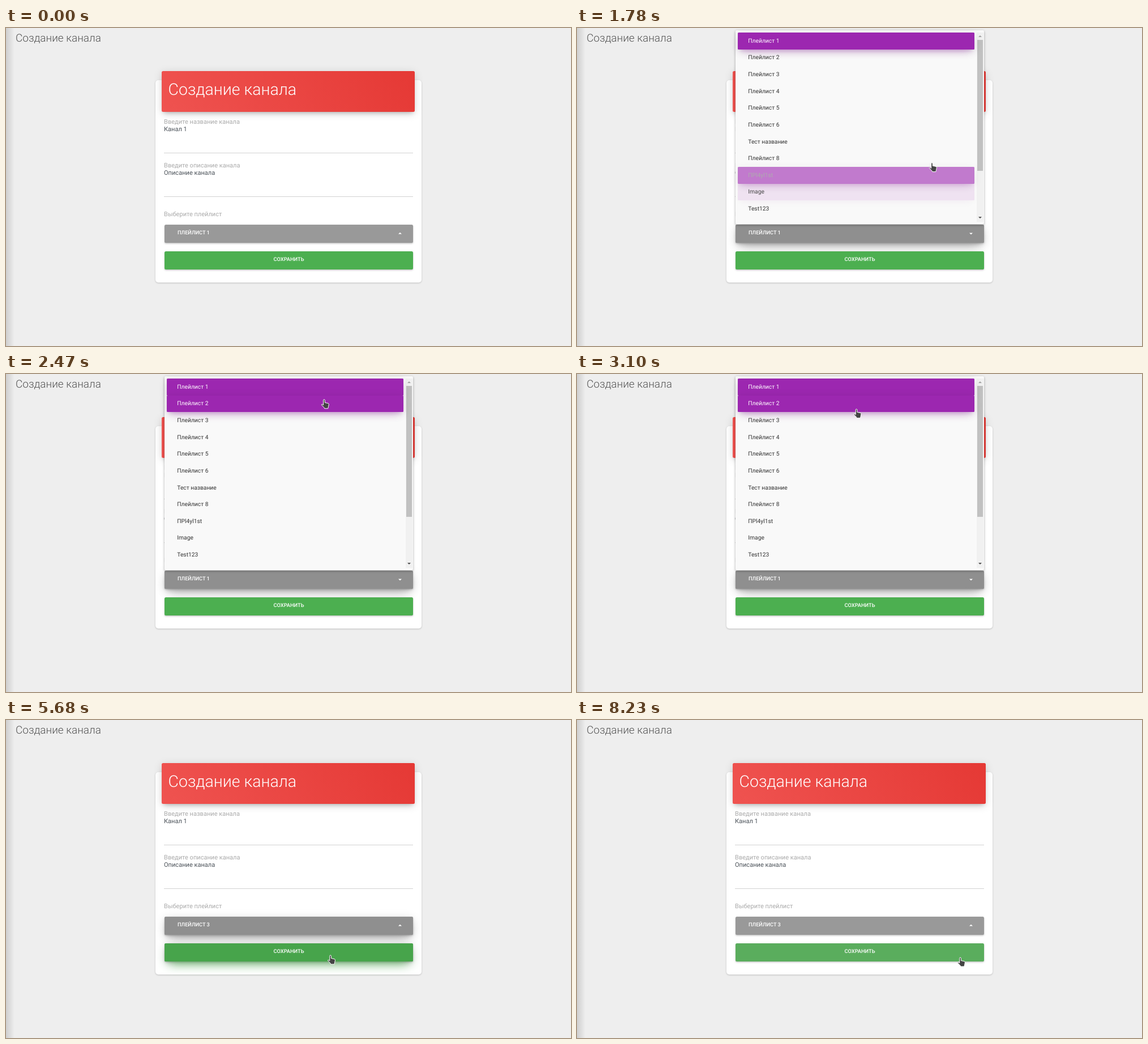
Recreate the animation shown at these times as an HTML page. Size 998 by 561 pixels, loop 8.26 s.

```html
<!DOCTYPE html>
<html lang="ru">
<meta charset="utf-8">
<title>Создание канала</title>
<style>
html, body { margin: 0; width: 100%; height: 100%; overflow: hidden; background: #eee; }
body { position: relative; font: 11.06px/1 Roboto, sans-serif; text-rendering: geometricPrecision; }
div, svg { position: absolute; box-sizing: border-box; }
.text { white-space: nowrap; transform: translateY(-50%); line-height: 1.17; }
.light { font-weight: 300; }
.label { left: 279px; color: #aaa; }
.value { left: 279px; color: #495057; }
.line { left: 279px; width: 440px; height: 1px; background: #d2d2d2; }
#edge { left: 0; top: 0; width: 15px; height: 561px; background: linear-gradient(90deg, #0002, #0000); }
#card { left: 264px; top: 92px; width: 470px; height: 357px; border-radius: 5px; background: #fff; box-shadow: 0 1px 3px #0003; }
#header { left: 275px; top: 76px; width: 447px; height: 72px; border-radius: 2.5px; color: #fff;
  background: linear-gradient(60deg, #ef5350, #e53935); box-shadow: 0 3px 16px #00000024, 0 5px 8px -4px #0004; }
.button { left: 280px; width: 439px; height: 32px; border-radius: 2.5px; color: #fff; font-size: 9.25px; font-weight: 500;
  background: var(--base); box-shadow: 0 1.5px 2px #00000024, 0 1px 4px #0000001f; }
.button::before { content: ""; position: absolute; inset: 0; border-radius: inherit; opacity: var(--on, 0);
  background: var(--hover); box-shadow: 0 11px 20px -9px var(--base), 0 3px 18px #0000001f, 0 6px 8px -4px #0003; }
.clip { inset: 0; overflow: hidden; border-radius: inherit; }
.ripple { border-radius: 50%; }
#caret { left: 413px; top: 13.5px; width: 6px; height: 3px; background: #fff; clip-path: polygon(0 100%, 50% 0, 100% 100%); }
#menu { left: 280px; top: 4px; width: 438.5px; height: 342px; border-radius: 2px; background: #f9f9f9;
  box-shadow: 0 1.5px 4px #0005; transform-origin: 0 100%; }
.item { left: 4px; width: 417.5px; height: 29.63px; font-size: 10.27px; color: color-mix(in srgb, #fff calc(var(--on) * 100%), #333); }
.item::before { content: ""; position: absolute; inset: 0; border-radius: 1.5px; opacity: var(--on); background: #9c27b0;
  box-shadow: 0 9px 16px -8px #9c27b066, 0 3px 16px #0000001f, 0 6px 6px -4px #9c27b033; }
.item .text { left: 18.3px; top: 50%; }
#track { left: 426px; top: 4px; width: 12px; height: 334px; background: #f1f1f1; }
#thumb { left: 1px; top: 13px; width: 10px; height: 231px; background: #c1c1c1; }
.arrow { left: 3px; width: 6px; height: 3px; background: #a3a3a3; clip-path: polygon(0 100%, 50% 0, 100% 100%); }
.arrow.down { background: #505050; transform: scaleY(-1); }
#cursor { left: 0; top: 0; }
</style>
<body>
<div id="edge"></div>
<div class="text light" style="left:17px;top:18px;font-size:18.96px;color:#555">Создание канала</div>
<div id="card"></div>
<div id="header"><div class="text light" style="left:11.5px;top:33px;font-size:28.44px">Создание канала</div></div>
<div class="text label" style="top:166px">Введите название канала</div>
<div class="text value" style="top:178.5px">Канал 1</div>
<div class="line" style="top:219.5px"></div>
<div class="text label" style="top:243px">Введите описание канала</div>
<div class="text value" style="top:255.5px">Описание канала</div>
<div class="line" style="top:296.5px"></div>
<div class="text label" style="top:328.5px">Выберите плейлист</div>
<div class="button" id="select" style="top:347px;--base:#999;--hover:#8f8f8f">
  <div class="clip"><div class="ripple" id="selectRipple" style="background:#000"></div></div>
  <div class="text" id="choice" style="left:23px;top:15px"></div>
  <div id="caret"></div>
</div>
<div class="button" id="save" style="top:393.5px;--base:#4caf50;--hover:#47a44b">
  <div class="clip"><div class="ripple" id="saveRipple" style="background:#fff"></div></div>
  <div class="text" style="left:0;width:100%;top:15px;text-align:center">СОХРАНИТЬ</div>
</div>
<div id="menu">
  <div id="track">
    <div class="arrow" style="top:5px"></div><div id="thumb"></div><div class="arrow down" style="top:325px"></div>
  </div>
</div>
<svg id="cursor" width="998" height="561"><path id="pointer" fill="#444" stroke="#fff"/></svg>
<script>
const LOOP = 8260, OPEN = 940, PICK = 4240, SAVE = 7450;
const ROW = 29.63, ROW_TOP = 8;
const $ = id => document.getElementById(id);
const clamp = x => Math.min(1, Math.max(0, x));
const ramp = (t, start, length) => clamp((t - start) / length);

const names = ['Плейлист 1', 'Плейлист 2', 'Плейлист 3', 'Плейлист 4', 'Плейлист 5', 'Плейлист 6',
  'Тест название', 'Плейлист 8', 'ПPl4yl1st', 'Image', 'Test123'];
const items = names.map((name, i) => {
  const item = document.createElement('div');
  item.className = 'item';
  item.style.top = 4 + i * ROW + 'px';
  item.innerHTML = `<div class="text">${name}</div>`;
  $('menu').append(item);
  return item;
});

// Pointer path: time, x, y
const path = [[100, 1000, 68], [400, 890, 130], [700, 735, 290], [880, 654, 364], [1270, 654, 364],
  [1500, 642, 320], [1780, 627, 238], [2100, 603, 128], [2270, 583, 62], [2470, 562, 45], [2600, 545, 48],
  [2950, 505, 58], [3310, 486, 65], [3580, 486, 65], [3640, 483, 72], [3790, 480, 77], [4270, 480, 77],
  [4600, 500, 200], [5050, 545, 364], [5300, 562, 395], [5680, 573, 415], [5900, 581, 415], [6300, 620, 417],
  [6700, 650, 416], [6760, 650, 416], [7240, 655, 415], [7450, 655, 415], [7700, 676, 412], [7990, 676, 412],
  [8230, 677, 419], [LOOP, 677, 419]];

function slope(i, axis) {
  const a = path[i - 1], b = path[i], c = path[i + 1];
  if (!a || !c || a[axis] === b[axis] || b[axis] === c[axis]) return 0;
  return (c[axis] - a[axis]) / (c[0] - a[0]);
}

function pointerAt(t) {
  const i = Math.max(1, path.findIndex(p => p[0] >= t));
  const a = path[i - 1], b = path[i], span = b[0] - a[0], u = clamp((t - a[0]) / span), v = 1 - u;
  return [1, 2].map(k => v * v * (1 + 2 * u) * a[k] + u * u * (3 - 2 * u) * b[k]
    + span * u * v * (v * slope(i - 1, k) - u * slope(i, k)));
}

// cubic-bezier(.4, 0, .2, 1)
function ease(x) {
  if (x <= 0 || x >= 1) return clamp(x);
  let low = 0, high = 1, s;
  for (let n = 0; n < 20; n++) {
    s = (low + high) / 2;
    if (1.2 * s * (1 - s) ** 2 + 0.6 * s * s * (1 - s) + s ** 3 < x) low = s; else high = s;
  }
  return s * s * (3 - 2 * s);
}

// Hover strength of every row after 150 ms linear transitions
function rowLevels(t) {
  const step = 5, end = Math.min(t, PICK), levels = names.map(() => 0);
  for (let s = Math.max(1250, end - 400); s <= end; s += step) {
    const row = Math.floor((pointerAt(s - 30)[1] - ROW_TOP) / ROW);
    levels.forEach((level, i) => levels[i] = clamp(level + (i === row ? step : -step) / 150));
  }
  levels[0] = 1;
  return levels;
}

const shapes = {
  hand: 'M-1.3 1.3Q-1.3 0 0 0T1.4 1.3V5.5L7 6.7Q8.6 7.2 8.4 8.9L7.6 12.9 6.8 15.9H.8L-.2 13.9-4.6 9.7Q-5 8.3-3.3 8.5L-1.3 9.7Z',
  arrow: 'M0 0V13L3 10.3 5.2 15 7.4 14 5.2 9.6H9.4Z',
  beam: 'M-2.5-7H2.5V-6H.5V6H2.5V7H-2.5V6H-.5V-6H-2.5Z'
};

function shapeFor(t, x, y) {
  if (t > OPEN && t < PICK + 150) return 'hand';
  const within = (top, bottom) => x > 280 && x < 719 && y > top && y < bottom;
  if (within(347, 379) || within(393, 426)) return 'hand';
  return within(171, 220) || within(248, 297) ? 'beam' : 'arrow';
}

function drawRipple(id, x, y, radius, opacity) {
  Object.assign($(id).style, { left: x - radius + 'px', top: y - radius + 'px',
    width: 2 * radius + 'px', height: 2 * radius + 'px', opacity });
}

function draw(t) {
  const shown = ease(ramp(t, OPEN, 300)) - ease(ramp(t, PICK, 300));
  $('menu').style.transform = `scale(${shown})`;
  $('menu').style.opacity = shown;
  rowLevels(t).forEach((level, i) => items[i].style.setProperty('--on', level));

  const blur = ramp(t, SAVE, 150);
  $('select').style.setProperty('--on', ramp(t, 850, 150) - blur);
  $('save').style.setProperty('--on', ramp(t, 5310, 150));
  // The pressed button keeps its hover colour but drops the raised shadow
  $('save').style.setProperty('--base', blur === 1 ? '#47a44b' : '#4caf50');
  if (blur === 1) $('save').style.setProperty('--on', 0);
  $('choice').textContent = t < PICK ? 'ПЛЕЙЛИСТ 1' : 'ПЛЕЙЛИСТ 3';
  $('caret').style.transform = `rotate(${180 * (ramp(t, OPEN, 150) - ramp(t, PICK, 150))}deg)`;

  const grow = 1 - (1 - ramp(t, OPEN, 335)) ** 2;
  drawRipple('selectRipple', 376, 17, 300 * grow, 0.07 * (1 - ramp(t, 1240, 360)));
  drawRipple('saveRipple', 375, 21, 400 * ramp(t, SAVE, 250), 0.1);

  const [x, y] = pointerAt(t);
  $('pointer').setAttribute('d', shapes[shapeFor(t, x, y)]);
  $('pointer').setAttribute('transform', `translate(${x} ${y})`);
  $('cursor').style.display = t < 100 ? 'none' : '';
}

const start = performance.now();
function tick() {
  draw((performance.now() - start) % LOOP);
  requestAnimationFrame(tick);
}
tick();
</script>
</body>
</html>
```
